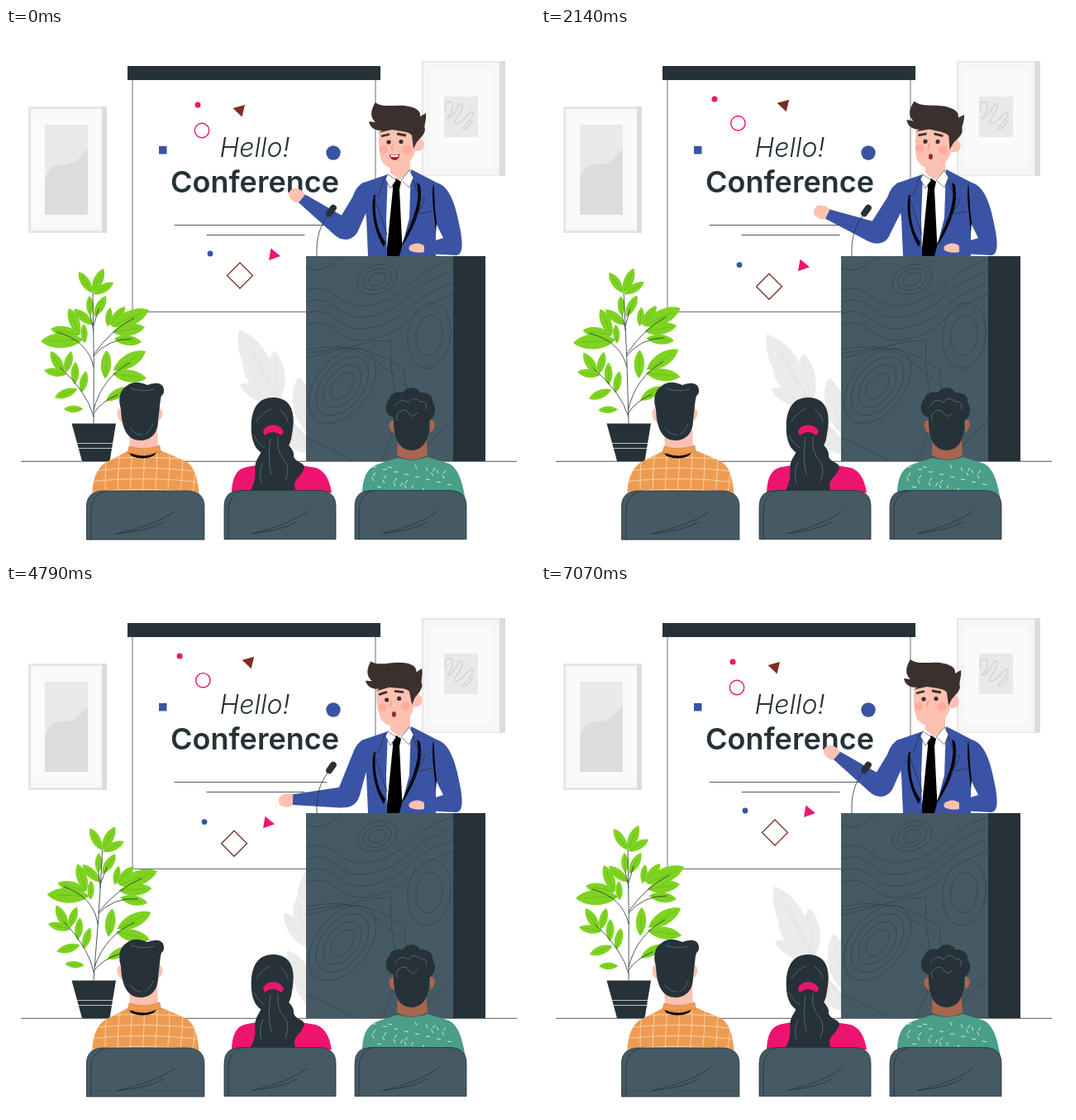
An HTML page that plays this animation: 640x640 px, repeating every 7.14 s.

```html
<!DOCTYPE html>
<html lang="en">
<head>
<meta charset="utf-8">
<title>Conference talk</title>
<style>
html, body { margin: 0; width: 100%; height: 100%; overflow: hidden; background: #fff; }
svg { display: block; width: 100vw; height: 100vh; }
.line { fill: none; stroke: #263238; stroke-width: .8; stroke-linecap: round; }
.dark { fill: #263238; }
.suit { fill: #3a53a4; }
.skin { fill: #fdc1b1; }
.pink { fill: #ed146f; }
</style>
</head>
<body>
<svg viewBox="0 0 640 640">
  <defs>
    <clipPath id="front"><path d="M363 276h178v248H363z"/></clipPath>
    <clipPath id="shirtA"><path id="shirtShape" d="M104 564C106 540 112 528 128 522L149 511 187 511 215 523C229 529 232 546 234 566Z"/></clipPath>
    <g id="chair">
      <path d="M0 59V19Q0 0 20 0H114Q135 0 135 19V59Z" fill="#455a64" stroke="#263238" stroke-width=".8"/>
      <path class="line" d="M5 59V24Q5 5 22 0M34 52Q78 42 101 25M34 52Q72 48 88 38"/>
    </g>
  </defs>

  <!-- wall pictures -->
  <path fill="#e6e6e6" d="M27 95h95v153H27z"/><path fill="#dcdcdc" d="M116 95h6v153h-6z"/>
  <path fill="#f8f8f8" d="M30 98h86v147H30z"/><path fill="#fafafa" d="M34 103h78v137H34z"/>
  <path fill="#e9e9e9" d="M47 117h52v109H47z"/>
  <path fill="#dcdcdc" d="M47 226V184C54 160 66 167 78 164S91 151 99 147V226Z"/>
  <path fill="#e6e6e6" d="M503 40h101v139H503z"/><path fill="#dcdcdc" d="M597 40h7v139h-7z"/>
  <path fill="#f6f6f6" d="M505 42h92v136h-92z"/><path fill="#fafafa" d="M513 50h75v119h-75z"/>
  <path fill="#e9e9e9" d="M530 83h41v49h-41z"/>
  <path fill="none" stroke="#d5d5d5" stroke-width="1.6" d="M532 100C527 88 541 84 540 96S529 111 536 109 549 86 552 93 536 117 545 116 563 96 565 103 546 124 555 122 562 110 566 112"/>

  <!-- screen -->
  <path fill="#fff" stroke="#263238" stroke-width=".7" d="M153 62h294v281.500H153z"/>
  <path class="dark" d="M147 46h306v17H147z"/>
  <g font-family="Inter, 'Open Sans', sans-serif" fill="#263238" text-anchor="middle">
    <text x="301" y="156" font-size="32" font-weight="300" font-style="italic">Hello!</text>
    <text x="301" y="199" font-size="36" font-weight="600">Conference</text>
  </g>
  <path class="line" d="M204 238.500H388M243 250.500H361"/>
  <path class="suit" d="M185 143h9.500v9.500h-9.500z"/><circle class="suit" cx="396" cy="151" r="8.700"/>
  <g id="floats">
    <circle data-to="-31.500,-10" class="pink" cx="232" cy="93" r="3.500"/>
    <circle data-to="2,-12.500" cx="237" cy="124" r="8.700" fill="none" stroke="#ed146f" stroke-width="1.400"/>
    <path data-to="16,-9" fill="#7a2f25" d="M274.500 97 289 93 285.500 107.500Z"/>
    <circle data-to="-10,19.500" class="suit" cx="247" cy="273" r="3.400"/>
    <path data-to="-10,19" class="pink" d="M320.500 266.500 332 276 318 281Z"/>
    <path data-to="-10,19" fill="none" stroke="#7a2f25" stroke-width="1.300" d="M283 284 298.500 299.500 283 315 267.500 299.500Z"/>
  </g>

  <path stroke="#777" stroke-width="1.200" d="M18 524.300H618"/>
  <g id="fern"></g>
  <g id="plant"></g>
  <path class="dark" d="M79.500 478.500H133L125.500 524H92Z"/>
  <path stroke="#fff" stroke-width=".7" d="M84 502.500H129M85 508.500H128"/>

  <!-- speaker -->
  <path class="skin" d="M465 160H489V182L477 196 465 182Z"/>
  <path fill="#fff" d="M459 181 465 175 476 184 488 173 495 182 484 276H460Z"/>
  <path d="M467 186 472 182 478 186 476 195 480 276H460L468 195Z"/>
  <path class="suit" d="M462 177 430 188 436 230 438 276H461L460 230Z"/>
  <path class="suit" d="M490 171 521 187C539 192 545 220 550 246 553 264 552 274 545 275L508 273 504 262 529 254 520 236V276H476L488 230Z"/>
  <path d="M445 202C441 218 445 246 457 265L459 259C449 247 445 224 447 202ZM497 187C503 214 489 238 477 266L483 258C496 236 505 214 501 190ZM517 188C514 206 519 229 520 249L521 234C518 217 519 202 517 188Z"/>
  <path class="line" d="M458 181 451 202 445 204 461 250M490 176 500 204 507 207 488 244M500 225 515 222M431 189Q436 207 437 222"/>
  <path fill="#fff" stroke="#263238" stroke-width=".6" d="M462 177 472 184 465 194 459 183ZM488 172 478 184 488 193 493 181Z"/>
  <path class="skin" d="M506 264C501 259 493 260 488 264Q486 268 490 270 498 273 506 271Z"/>
  <path id="upperArm" class="suit"/>
  <g id="forearm">
    <path class="skin" d="M-60-5C-68-10-78-8-80-3-82 2-80 7-74 8-69 9-64 7-60 5Z"/>
    <path class="suit" d="M-63-6.500-3-12C9-12 14-4 12 4 10 12 1 14-7 13L-64 6Z"/>
  </g>
  <g id="head">
    <circle class="skin" cx="498" cy="141" r="8"/>
    <path class="skin" d="M452 122C450 138 451 151 454 160 458 168 466 171 474 170 484 169 492 160 495 149V119Z"/>
    <g fill="#ff9f8d" opacity=".6"><circle cx="457" cy="147" r="5"/><circle cx="485" cy="147" r="5.500"/></g>
    <path fill="#3b302e" d="M449 127C455 125 456 123 452 124 443 123 440 118 439 113L447 114C440 108 441 99 447 90 456 98 475 91 488 95 497 97 502 101 501 107L508 103C509 113 505 117 507 123 506 130 500 134 497 138L493 146 491 130C489 126 480 125 467 123Z"/>
    <path fill="none" stroke="#3b302e" stroke-width="2.800" d="M454 131 464 128.500M473 128 484 130"/>
    <g fill="#3b302e"><circle cx="463" cy="138" r="2.600"/><circle cx="478" cy="137.500" r="2.600"/></g>
    <path fill="none" stroke="#ee8e7e" d="M469 140Q464 147 469 147"/>
    <g id="smile"><path fill="#b51f32" d="M463.500 153Q470 155 476 152 476 160 470 160 465 160 463.500 153Z"/><path fill="#fff" d="M465 153.500Q470 155 475 153L474 156H466Z"/></g>
    <g id="round"><ellipse cx="470.500" cy="156" rx="2.500" ry="3.400" fill="#9e2333"/></g>
  </g>

  <!-- podium -->
  <path fill="#455a64" d="M363 276h178v248H363z"/><path class="dark" d="M541 276h39v248h-39z"/>
  <g id="wood" clip-path="url(#front)" class="line" style="stroke:#33454e"></g>
  <path class="line" stroke-width="1.200" d="M376 276C375 253 380 239 390 226"/>
  <rect class="dark" x="389.500" y="213" width="8" height="16" rx="4" transform="rotate(36 393.500 221)"/>

  <!-- audience: left -->
  <path class="skin" d="M149 482H183L184 510Q166 518 150 510ZM141 459C131 459 134 475 141 477ZM183 460C193 459 190 474 183 476Z"/>
  <use href="#shirtShape" fill="#ee9b52"/>
  <g id="checks" clip-path="url(#shirtA)" fill="none" stroke="#ffdfb8" stroke-width=".8"></g>
  <path d="M148 513Q166 522 183 513L178 518Q166 523 152 518Z"/>
  <path fill="#ee9b52" stroke="#c97936" stroke-width=".6" d="M149 506Q167 512 186 505L187 513Q166 517 147 514Z"/>
  <path class="dark" d="M139 461C135 448 138 438 146 433 154 426 164 429 171 432 182 428 188 430 190 434 192 439 191 443 188 445 186 452 186 461 184 475 184 490 175 499 163 499 148 499 140 487 139 461Z"/>
  <path class="line" style="stroke:#61737c" d="M150 484Q157 493 164 492M178 479Q174 489 168 492M151 436Q166 441 179 437"/>
  <use href="#chair" transform="translate(97.500 560) scale(1.055 1)"/>

  <!-- audience: middle -->
  <path class="pink" d="M273 562C274 543 279 533 292 531L309 528H350L375 532C387 537 391 546 394 562Z"/>
  <path class="skin" d="M300 482Q294 485 300 494ZM346 482Q351 486 345 495Z"/>
  <path class="dark" d="M297 490C295 464 303 447 323 447 342 447 352 461 346 490 345 507 336 516 323 517 307 517 299 508 297 490Z"/>
  <path class="dark" d="M312 489C309 502 314 505 306 518 296 533 307 539 296 559H350C346 545 356 546 361 532 361 525 350 526 348 518 349 507 338 506 335 489Z"/>
  <path class="pink" d="M311 489C313 478 332 477 336 489L333 493Q323 485 313 493Z"/>
  <path class="line" style="stroke:#61737c" d="M303 476Q310 465 320 461M341 476Q338 465 331 462M320 496Q316 522 321 540M329 495Q327 512 336 522T338 548M311 526Q305 537 309 550M300 493Q305 503 313 508"/>
  <use href="#chair" transform="translate(264 559.500)"/>

  <!-- audience: right -->
  <path fill="#a8664e" d="M474 486H508L510 517Q491 527 473 517ZM470 475C460 473 463 489 470 490ZM513 474C522 473 519 488 513 489Z"/>
  <path fill="#4a9f88" d="M431 562C432 542 437 532 452 527L474 520Q491 526 510 519L536 527C548 533 553 552 556 572H431Z"/>
  <path id="dashes" fill="none" stroke="#d6edcf" stroke-width="1"/>
  <path class="dark" d="M469 471C457 469 458 453 464 449 465 440 476 440 480 441 486 433 498 434 501 441 511 440 518 447 516 453 523 462 517 473 512 475 513 493 508 510 491 511 475 511 468 496 469 471Z"/>
  <path class="line" style="stroke:#61737c" d="M471 457Q478 446 487 453 493 444 501 452 511 451 508 461M474 466Q482 458 487 466T498 465M474 475Q470 469 475 465"/>
  <use href="#chair" transform="translate(422 559.500)"/>
</svg>
<script>
const $ = id => document.getElementById(id);
const LOOP = 7140;

// Leaf with its midrib, from stem end to tip
function leaf([x, y, tx, ty], fat, fill, rib) {
  const dx = tx - x, dy = ty - y, nx = -dy * fat, ny = dx * fat;
  const side = s => `${x + dx * .25 + s * nx} ${y + dy * .25 + s * ny} ${x + dx * .75 + s * nx} ${y + dy * .75 + s * ny}`;
  return `<path fill="${fill}" d="M${x} ${y}C${side(1)} ${tx} ${ty}C${x + dx * .75 - nx} ${y + dy * .75 - ny} ${x + dx * .25 - nx} ${y + dy * .25 - ny} ${x} ${y}Z"/>` +
    `<path fill="none" stroke="${rib}" stroke-width=".5" d="M${x} ${y}L${x + dx * .8} ${y + dy * .8}"/>`;
}

const greens = [
  [105, 320, 118, 291], [104, 320, 88, 295], [106, 322, 130, 308],
  [102, 348, 101, 324], [107, 349, 121, 324], [105, 359, 82, 340],
  [89, 371, 76, 339], [89, 371, 54, 364], [93, 377, 42, 379], [95, 381, 94, 358],
  [123, 361, 126, 338], [126, 360, 144, 337], [128, 361, 173, 341],
  [129, 368, 168, 362], [131, 376, 164, 380],
  [70, 418, 54, 391], [72, 417, 79, 391], [73, 419, 46, 414],
  [83, 431, 84, 404], [91, 441, 97, 415], [86, 437, 59, 447], [93, 461, 70, 461],
  [120, 424, 122, 390], [130, 414, 169, 391], [129, 418, 170, 424], [121, 451, 147, 435]
];
$('plant').innerHTML =
  greens.map(g => leaf(g, .24, '#7ed321', '#5ca819')).join('') +
  '<path class="line" d="M106 478Q107 400 105 320M106 410Q99 378 62 368M106 395Q127 365 155 351M106 397Q123 376 152 376M106 470Q98 440 66 411M106 462Q116 423 150 405M106 366 102 347M106 360 112 340M106 466Q115 452 135 444"/>';

const greys = [
  [352, 432, 339, 342], [350, 435, 329, 384], [355, 442, 317, 405],
  [354, 440, 370, 381], [372, 500, 329, 449], [376, 515, 342, 474], [374, 488, 387, 420]
];
$('fern').innerHTML = greys.map(g => leaf(g, .23, '#ebebeb', '#dedede')).join('') +
  '<path fill="none" stroke="#dedede" d="M375 515Q355 466 346 370"/>';

// Wood grain: nested knots and long waves
const knots = [[449, 304, 25, 17, -22, 3], [407, 433, 52, 32, -52, 4], [512, 372, 26, 40, 8, 2]];
let grain = '';
for (const [x, y, rx, ry, turn, rings] of knots)
  for (let i = 0; i < rings; i++) {
    const k = 1 - i / (rings + .6);
    grain += `<ellipse cx="${x}" cy="${y}" rx="${rx * k}" ry="${ry * k}" transform="rotate(${turn} ${x} ${y})"/>`;
  }
for (let i = 0; i < 4; i++) {
  const y = 318 + i * 14;
  grain += `<path d="M363 ${y}C400 ${y - 15} 398 ${y + 28} 445 ${y + 16}S483 ${y - 18} 541 ${y - 38}"/>`;
}
for (let i = 0; i < 3; i++) {
  const x = 466 + i * 17;
  grain += `<path d="M363 ${399 - i * 5}C410 ${390 - i * 4} 430 378 ${x} ${378 + i * 36}C${x - 5} 445 ${x + 24} 450 ${x - 12} 524"/>`;
}
grain += '<path d="M363 496Q400 510 420 524M363 290Q382 300 407 276M541 477Q510 495 503 524"/>';
$('wood').innerHTML = grain;

let checks = '';
for (let i = 0; i < 9; i++) checks += `M${108 + i * 15} 506Q${103 + i * 16} 536 ${105 + i * 15} 568`;
for (let y = 520; y < 570; y += 13) checks += `M100 ${y + 3}Q168 ${y - 5} 238 ${y + 4}`;
$('checks').innerHTML = `<path d="${checks}"/>`;

let dashes = '';
for (let i = 0; i < 28; i++) {
  const x = 443 + i * 37 % 98, y = 531 + i * 19 % 27, a = i * 2.1;
  dashes += `M${x} ${y}l${5 * Math.cos(a)} ${5 * Math.sin(a)}`;
}
$('dashes').setAttribute('d', dashes);

// Value at t between [time, value] keys, eased by a half cosine
function track(t, ...keys) {
  const i = Math.max(1, keys.findIndex(k => k[0] > t));
  const [t0, a] = keys[i - 1], [t1, b] = keys[i];
  return a + (b - a) * (1 - Math.cos(Math.PI * (t - t0) / (t1 - t0))) / 2;
}
const place = (el, value) => el.setAttribute('transform', value);

function draw(t) {
  const drift = track(t, [0, 0], [3400, 1], [LOOP, 0]);
  for (const el of $('floats').children) {
    const [dx, dy] = el.dataset.to.split(',');
    place(el, `translate(${dx * drift} ${dy * drift})`);
  }
  place($('plant'), `rotate(${track(t, [0, 0], [1000, 4.8], [3000, -6], [5150, 5], [LOOP, 0])} 106 478)`);
  place($('fern'), `rotate(${track(t, [0, -20], [1500, -26], [5250, 11], [LOOP, -20])} 375 515)`);
  place($('head'), `rotate(${track(t, [0, 0], [950, -4], [2700, 5.5], [4790, -4], [LOOP, 0])} 476 172)`);

  const drop = track(t, [0, 0], [600, 0], [4300, 1], [5250, 1], [LOOP, 0]);
  const reach = track(t, [0, 0], [600, 0], [2300, 4], [4400, 0], [6140, -4], [LOOP, 0]);
  const x = 410 - reach, y = 243 + 13 * drop;
  place($('forearm'), `translate(${x} ${y}) rotate(${35 - 38.5 * drop})`);
  $('upperArm').setAttribute('d', `M433 187Q424 190 419 205L${x - 8} ${y - 10} ${x + 1} ${y + 13}Q${x + 13} ${y + 12} ${x + 17} ${y}L438 218Z`);

  const beat = t % 760, open = t < 7000, smile = beat < 200 || beat > 640;
  $('smile').style.display = open && smile ? '' : 'none';
  $('round').style.display = open && !smile ? '' : 'none';
}

function frame() {
  draw(performance.now() % LOOP);
  requestAnimationFrame(frame);
}
frame();
</script>
</body>
</html>
```
